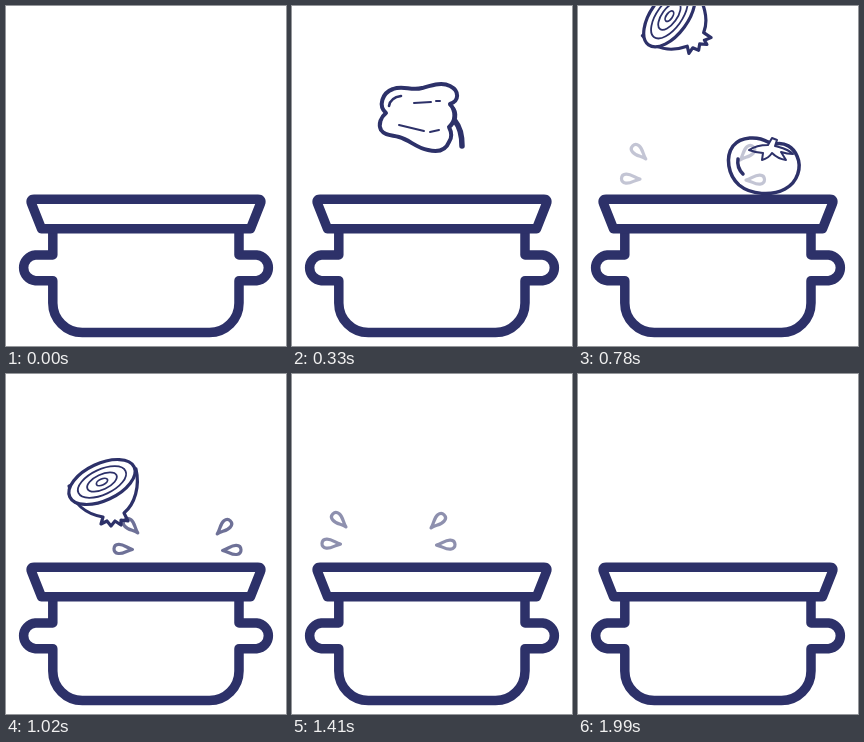
These frames come from a looping animation (280 px wide and 340 px high, 2.09 s). An HTML page:

```html
<!DOCTYPE html>
<html lang="en">
<head>
<meta charset="utf-8">
<title>Cooking pot</title>
<style>
  html, body { margin: 0; width: 100%; height: 100%; overflow: hidden; background: #fff; }
  svg { display: block; width: 280px; height: 340px; }
</style>
</head>
<body>
<svg viewBox="0 0 280 340" fill="none" stroke="#2d3169" stroke-linecap="round" stroke-linejoin="round">
  <defs>
    <clipPath id="above"><rect width="280" height="192"/></clipPath>
    <path id="drop" d="M11 0C6 1 2 5-3 4.5C-9 4-9-4-3-4.500C2-5 6-1 11 0Z" stroke-width="3.2"/>
  </defs>

  <g clip-path="url(#above)">
    <g id="pepper" stroke-width="4">
      <path fill="#fff" d="M94 107C86 100 90 87 101 83C111 79 119 85 130 82C141 79 150 76 158 80C168 85 167 95 158 98C164 105 164 115 157 121C160 127 160 132 157 136C153 146 144 146 136 144C124 142 118 134 107 131C100 129 93 130 89 124C86 118 89 111 94 107Z"/>
      <path stroke-width="2.600" d="M97 100C98 94 102 91 109 90"/>
      <path stroke-width="2" d="M122 97L139 96M144 95L148 95M107 119L132 125M138 126L147 124"/>
      <path stroke-width="3" d="M158 99C165 103 166 113 159 120"/>
      <path stroke-width="5.500" d="M163 115C168 121 170 130 170 140"/>
    </g>

    <g id="tomato" stroke-width="3.500">
      <path fill="#fff" d="M190 136C180 130 163 130 155 140C147 151 150 169 161 179C173 189 194 190 207 183C220 176 224 161 219 150C215 141 207 136 197 138Z"/>
      <path fill="#fff" stroke-width="2" d="M190 139L194 132L199 134L197 140C204 142 210 143 215 148C209 148 206 147 203 146L208 154C201 153 197 150 194 147C192 150 188 153 184 154L185 147C180 147 176 146 171 144C177 140 184 139 190 139Z"/>
      <path d="M160 153C159 159 161 164 165 168"/>
    </g>

    <g id="onion" stroke-width="3.200">
      <path fill="#fff" d="M63 112C67 130 80 140 97 143L95 150L101 147L105 152L109 147L115 151L115 146L122 147L118 139C129 130 134 112 130 95Z"/>
      <g transform="translate(96 108) rotate(-25)">
        <ellipse fill="#fff" rx="35.500" ry="18.500"/>
        <g stroke-width="1.800">
          <ellipse rx="26" ry="12.500"/>
          <ellipse rx="16" ry="7.500"/>
          <ellipse rx="6" ry="3"/>
        </g>
      </g>
    </g>

    <g id="splashes"></g>
    <path id="steam" stroke-width="4.500"/>
  </g>

  <g stroke-width="9.500" stroke-linecap="butt">
    <path fill="#fff" d="M46.800 224V249H29.400A12.900 12.900 0 0 0 29.400 274.700H46.800V297A29.500 29.500 0 0 0 76.300 326.500H203.500A29.500 29.500 0 0 0 233 297V274.700H250.600A12.900 12.900 0 0 0 250.600 249H233V224"/>
    <path fill="#fff" d="M28 193.300H252Q256 193.300 254.500 197.500L244.500 222.800H35.500L25.500 197.500Q24 193.300 28 193.300Z"/>
  </g>
</svg>

<script>
const LOOP = 2090, STEP = 30;
const byId = id => document.getElementById(id);
const clamp = v => Math.max(0, Math.min(1, v));

// (x, y) is the drawn centre at time "at"; speed in px/ms, spin in deg/ms
const foods = [
  { id: 'pepper', x: 127, y: 113, at: 330, speed: .457, spin: .133, from: 30, to: 630 },
  { id: 'tomato', x: 186, y: 160, at: 780, speed: .559, spin: .25, from: 390, to: 930 },
  { id: 'onion', x: 98, y: 118, at: 1020, speed: .417, spin: .121, from: 600, to: 1290 }
].map(food => ({ ...food, node: byId(food.id) }));

const splashes = [
  { x: 115, start: 550 },
  { x: 171.5, start: 870 },
  { x: 96.5, start: 1230 }
].map(splash => {
  const node = document.createElementNS('http://www.w3.org/2000/svg', 'g');
  node.innerHTML = '<use href="#drop"/>'.repeat(4);
  byId('splashes').append(node);
  return { ...splash, node };
});

const steam = byId('steam');
steam.setAttribute('d', [112, 140, 168].map(x =>
  `M${x} 45C${x - 12} 32 ${x + 1} 30 ${x} 23C${x - 1} 16 ${x + 11} 14 ${x} 2`).join(''));

function drawFood({ node, x, y, at, speed, spin, from, to }, t) {
  const age = t - at;
  node.style.display = t >= from && t < to ? '' : 'none';
  node.setAttribute('transform',
    `translate(${x} ${y + age * speed}) rotate(${age * spin}) translate(${-x} ${-y})`);
}

function drawSplash({ node, x, start }, t) {
  const age = t - start;
  const alpha = clamp(1.45 - .0051 * age);
  node.style.display = age > 0 && alpha > 0 ? '' : 'none';
  node.setAttribute('opacity', alpha);
  const high = { dx: 47.5 + .094 * (age - 150), y: 143.5 + .0025 * (age - 205) ** 2, turn: 45 };
  const low = { dx: 56 + .1 * (age - 150), y: 169 + .003 * (age - 195) ** 2, turn: 2 };
  [high, low].forEach((drop, i) => [1, -1].forEach((side, j) => {
    node.children[i * 2 + j].setAttribute('transform',
      `translate(${x - side * drop.dx} ${drop.y + j}) scale(${side} 1) rotate(${drop.turn})`);
  }));
}

function drawSteam(t) {
  const rise = 1 - (1 - clamp((t - 1440) / 450)) ** 3;
  steam.style.display = t > 1440 && t < 1990 ? '' : 'none';
  steam.setAttribute('transform', `translate(0 ${190 - 87 * rise})`);
  steam.setAttribute('opacity', .7 * clamp((1920 - t) / 300));
}

function draw(time) {
  const t = time >= 1990 ? 1990 : Math.min(1890, Math.floor(time / STEP) * STEP);
  foods.forEach(food => drawFood(food, t));
  splashes.forEach(splash => drawSplash(splash, t));
  drawSteam(t);
}

const begin = performance.now();
function tick() {
  draw((performance.now() - begin) % LOOP);
  requestAnimationFrame(tick);
}
tick();
</script>
</body>
</html>
```
